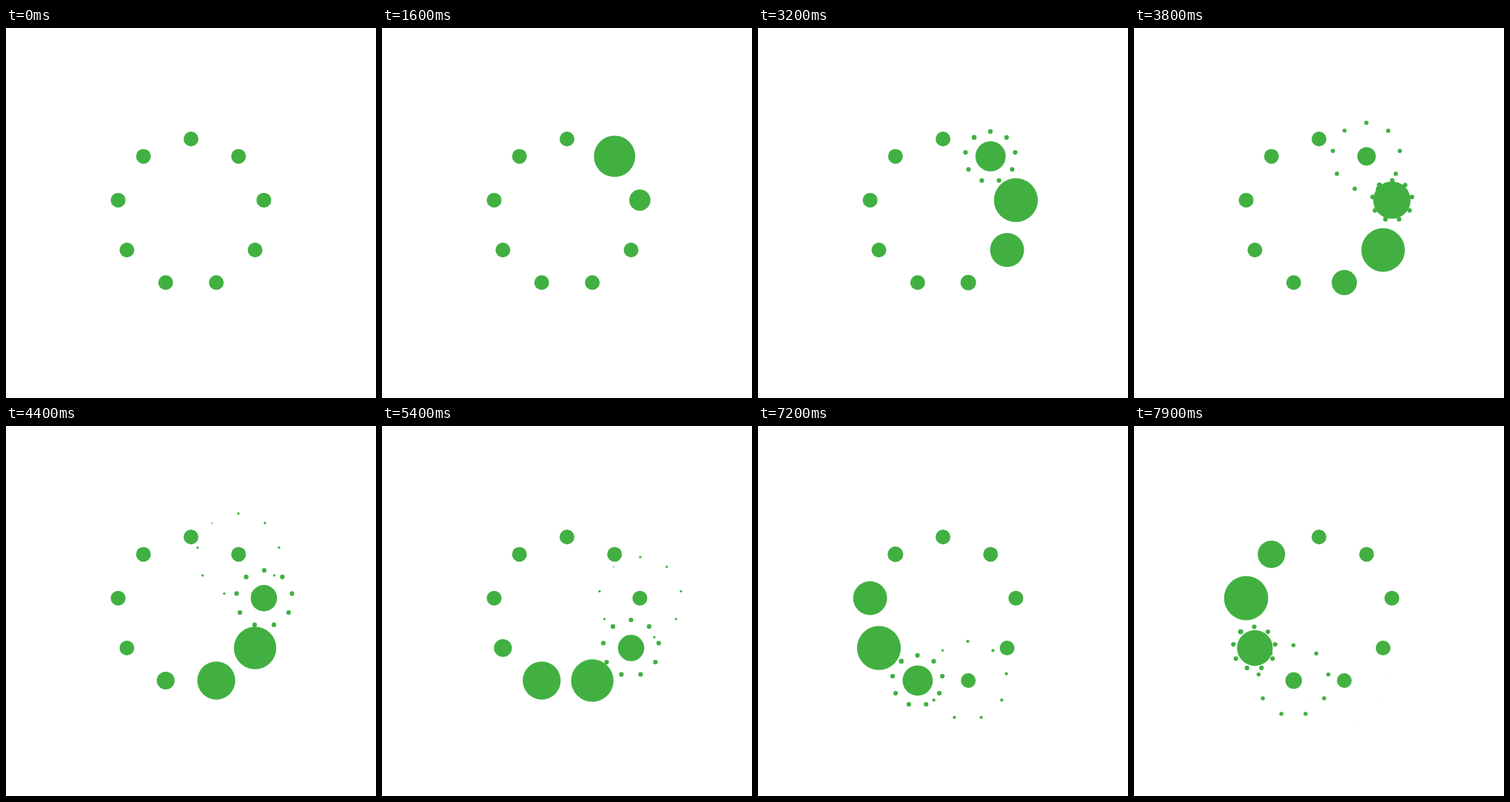
Recreate the animation shown at these times as an HTML page with a canvas. Size 500 by 500 pixels, loop 8 s.

```html
<!DOCTYPE html>
<html lang="en">
<head>
<meta charset="utf-8">
<title>Bursting dot ring</title>
<style>
html, body { margin: 0; width: 100%; height: 100%; overflow: hidden; background: #fff; }
canvas { display: block; width: 500px; height: 500px; }
</style>
</head>
<body>
<canvas id="stage" width="500" height="500"></canvas>
<script>
const ctx = document.getElementById("stage").getContext("2d");
const LOOP = 8000, STEP = 100, COUNT = 9, STAGGER = 1000;
const COLOR = "#41b041";

// Burst centres sit slightly off their dots.
const burstAt = [null, [314, 174], [349, 233], [336.5, 300], [283.5, 344],
  [215.5, 344], [162.5, 300], [151.5, 233], [185.5, 174]];

const span = (t, a, b) => Math.min(1, Math.max(0, (t - a) / (b - a)));
const smooth = p => p * p * (3 - 2 * p);
const easeIn = p => 3 * (1 - p) * p * p * 0.605 + p * p * p;

function polar(cx, cy, r, i) {
  const a = i * 2 * Math.PI / COUNT - Math.PI / 2;
  return [cx + r * Math.cos(a), cy + r * Math.sin(a)];
}

function disc([x, y], r) {
  if (r <= 0) return;
  ctx.beginPath();
  ctx.arc(x, y, r, 0, 2 * Math.PI);
  ctx.fill();
}

function dotRadius(t) {
  return t < 2000
    ? 10 + 20 * smooth(span(t, 0, 2000))
    : 30 - 20 * easeIn(span(t, 2000, 4000));
}

function sparkRadius(t, last) {
  const full = last ? 3.5 - 0.4 * span(t, 2900, 3500) : 3.1;
  return full * (1 - easeIn(span(t, 3500, last ? 4650 : 5000)));
}

function burst([cx, cy], t) {
  if (t < 2000 || t >= 5000) return;
  const reach = 20 + 40 * smooth(span(t, 2000, 5000));
  for (let i = 0; i < COUNT; i++) {
    disc(polar(cx, cy, reach, i), sparkRadius(t, i === COUNT - 1));
  }
}

function draw(time) {
  ctx.fillStyle = "#fff";
  ctx.fillRect(0, 0, 500, 500);
  ctx.fillStyle = COLOR;
  disc(polar(250, 250, 100, 0), 10);
  for (let i = 1; i < COUNT; i++) {
    const t = time - (i - 1) * STAGGER;
    burst(burstAt[i], t);
    disc(polar(250, 250, 100, i), dotRadius(t));
  }
}

const start = performance.now();
function tick() {
  const time = (performance.now() - start) % LOOP;
  draw(Math.floor(time / STEP) * STEP);
  requestAnimationFrame(tick);
}
tick();
</script>
</body>
</html>
```
